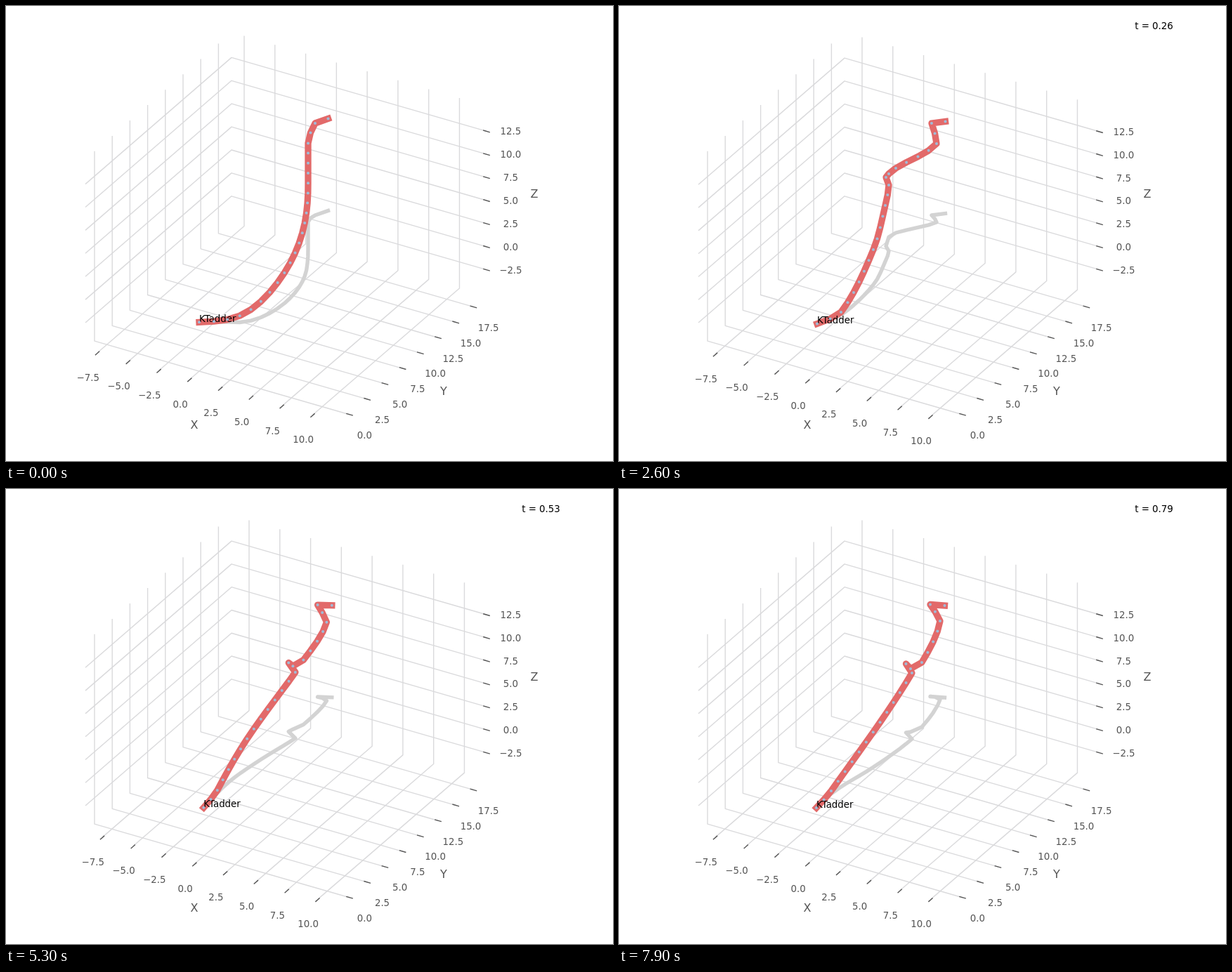
An HTML page with a canvas for the animation above (8 s loop, 864x648 px).

```html
<!DOCTYPE html>
<html lang="en">
<head>
<meta charset="utf-8">
<title>3D rod motion</title>
<style>
html, body { margin: 0; width: 100%; height: 100%; overflow: hidden; background: #fff; }
canvas { display: block; width: 864px; height: 648px; }
</style>
</head>
<body>
<canvas id="stage" width="864" height="648"></canvas>
<script>
const ctx = document.getElementById('stage').getContext('2d');
const LOOP = 8000, STEP = 100, JOINTS = 25, FOLD = 14;
const FONT = '"DejaVu Sans", Verdana, sans-serif';
const GRID = '#dadadc', INK = '#555555';

// Screen vectors of one tick step along each axis.
const X = [43.78, 12.65], Y = [25.2, -21.9];

const clamp = v => Math.max(0, Math.min(1, v));
const range = (n, f) => Array.from({ length: n }, (_, i) => f(i));

// Smooth curve through values v at positions p.
function spline(p, v, at) {
  const last = p.length - 1;
  let i = 0;
  while (i < last - 1 && at > p[i + 1]) i++;
  const slope = j => {
    const a = Math.max(0, j - 1), b = Math.min(last, j + 1);
    return (v[b] - v[a]) / (p[b] - p[a]);
  };
  const h = p[i + 1] - p[i], u = clamp((at - p[i]) / h);
  const u2 = u * u, u3 = u2 * u;
  return (2 * u3 - 3 * u2 + 1) * v[i] + (u3 - 2 * u2 + u) * h * slope(i)
    + (3 * u2 - 2 * u3) * v[i + 1] + (u3 - u2) * h * slope(i + 1);
}

// All joints of a curve given by a few points [joint, ...values].
function joints(points, col) {
  const p = points.map(q => q[0]), v = points.map(q => q[col]);
  return range(JOINTS, k => spline(p, v, k));
}

// At rest the rod lies flat, then bends up into a straight rise.
const restX = k => 275 + 155 * (1 - Math.max(0, 1 - k / 17) ** 2.4);
const restY = k => 451 - 14.2 * Math.log(1 + Math.exp(k - 3));
const rest = [...range(22, k => [k, restX(k), restY(k)]), [23, 440, 167], [24, 458.5, 160.5]];

const waved = [
  [0, 275, 450], [2, 310, 446], [8, 387, 370], [12, 398, 309], [15, 400, 267],
  [17, 399, 242], [21, 433, 195], [23, 438, 166], [24, 458, 162]
];
const folded = [
  [0, 282, 452.5], [2, 316, 436], [8, 362, 347], [12, 379, 284], [14, 384, 255],
  [15, 380, 244], [16, 384, 239], [17, 394, 231], [21, 452, 196], [23, 445, 167], [24, 464.5, 164.5]
];
const settled = [
  [0, 281, 454], [2, 302, 430], [14, 417, 262], [15, 408.5, 249], [16, 415, 256],
  [17, 431, 247], [21, 457, 188], [23, 443, 164.5], [24, 463.5, 166]
];
const shapes = [rest, waved, folded, settled].map(s => ({ x: joints(s, 1), y: joints(s, 2) }));
const phases = [0, 1500, 2600, 5200];

// Height of each joint above its shadow.
const lift = joints([[0, 0], [2, 4], [8, 50], [14, 94], [15, 98], [16, 90],
  [17, 92], [21, 112], [23, 131], [24, 131]], 1);

function bodyAt(t) {
  const settle = clamp((t - 2600) / 5300);
  const phase = Math.min(t, 2600) + 2600 * (1 - (1 - settle) ** 2.3);
  const rise = 0.87 + 0.13 * clamp(t / 1500);
  return range(JOINTS, k => {
    // A wave runs up the lower part while it settles.
    const sway = k < FOLD + 1
      ? -9 * Math.sin(Math.PI * settle) * Math.sin(Math.PI * k / (6.5 + 13 * settle))
      : 0;
    return {
      x: spline(phases, shapes.map(s => s.x[k]), phase) + sway,
      y: spline(phases, shapes.map(s => s.y[k]), phase) + sway / 2,
      lift: lift[k] * (k <= FOLD + 1 ? rise : 1)
    };
  });
}

function line(points, color, width, cap = 'butt') {
  ctx.strokeStyle = color;
  ctx.lineWidth = width;
  ctx.lineCap = cap;
  ctx.lineJoin = 'round';
  ctx.beginPath();
  points.forEach(([x, y]) => ctx.lineTo(x, y));
  ctx.stroke();
}

function text(str, x, y, color, size = 13.33, align = 'center') {
  ctx.font = `${size}px ${FONT}`;
  ctx.fillStyle = color;
  ctx.textAlign = align;
  ctx.fillText(str, x, y);
}

const tickLabel = v => (v < 0 ? '\u2212' : '') + Math.abs(v).toFixed(1);
const grid = points => line(points, GRID, 1.4);
const tick = (x, y, dx, dy) => line([[x - dx, y - dy], [x + dx, y + dy]], INK, 1.4);

function drawAxes(t) {
  const slide = clamp((t - 1450) / 1150);
  const zStep = 32.9 - 0.12 * clamp(t / 1500);

  for (let i = 0; i < 8; i++) {
    const x = X[0] * i + 7 * slide, y = X[1] * i + 2.1 * slide;
    grid([[339 + x, 42.5 + y], [339 + x, 313.5 + y], [130.5 + x, 493.5 + y]]);
    tick(130 + x, 494.5 + y, 3.1, -2.7);
    text(tickLabel(i * 2.5 - 7.5), 116.7 + x, 533.7 + y, INK);
  }
  for (let i = 0; i < 8; i++) {
    const x = Y[0] * i, y = Y[1] * i;
    grid([[126 + x, 206.8 + y], [126 + x, 477.2 + y], [489.5 + x, 582 + y]]);
    tick(489 + x, 581.8 + y, 4.8, 1.4);
    text(tickLabel(i * 2.5), 510.3 + x, 616 + y, INK);
  }
  for (let i = 0; i < 7; i++) {
    const y = -zStep * i;
    grid([[113, 451 + y], [321, 270.8 + y], [684, 375.7 + y]]);
    tick(684, 375.8 + y, 4.8, 1.4);
    text(tickLabel(i * 2.5 - 2.5), 718.4, 380.8 + y, INK);
  }

  text('X', 268, 601.5, INK, 16);
  text('Y', 623, 553.5, INK, 16);
  text('Z', 752, 272.5, INK, 16);
}

function draw(t) {
  ctx.fillStyle = '#fff';
  ctx.fillRect(0, 0, 864, 648);
  drawAxes(t);

  const body = bodyAt(t);
  line(body.map(j => [j.x, j.y + j.lift]), '#d3d3d3', 5.4, 'square');
  line(body.map(j => [j.x, j.y]), '#e26a6a', 9.3, 'square');
  text('KTadder', body[0].x, body[0].y - 0.3, '#000', 13.33, 'left');

  ctx.fillStyle = '#9fbcd8';
  for (const j of body) {
    ctx.beginPath();
    ctx.arc(j.x, j.y, 2, 0, Math.PI * 2);
    ctx.fill();
  }

  if (t > 0) text('t = ' + (t / 10000).toFixed(2), 788.8, 32.8, '#000', 13.33, 'right');
}

const start = performance.now();
function frame() {
  const t = (performance.now() - start) % LOOP;
  draw(Math.floor(t / STEP) * STEP);
  requestAnimationFrame(frame);
}
frame();
</script>
</body>
</html>
```
